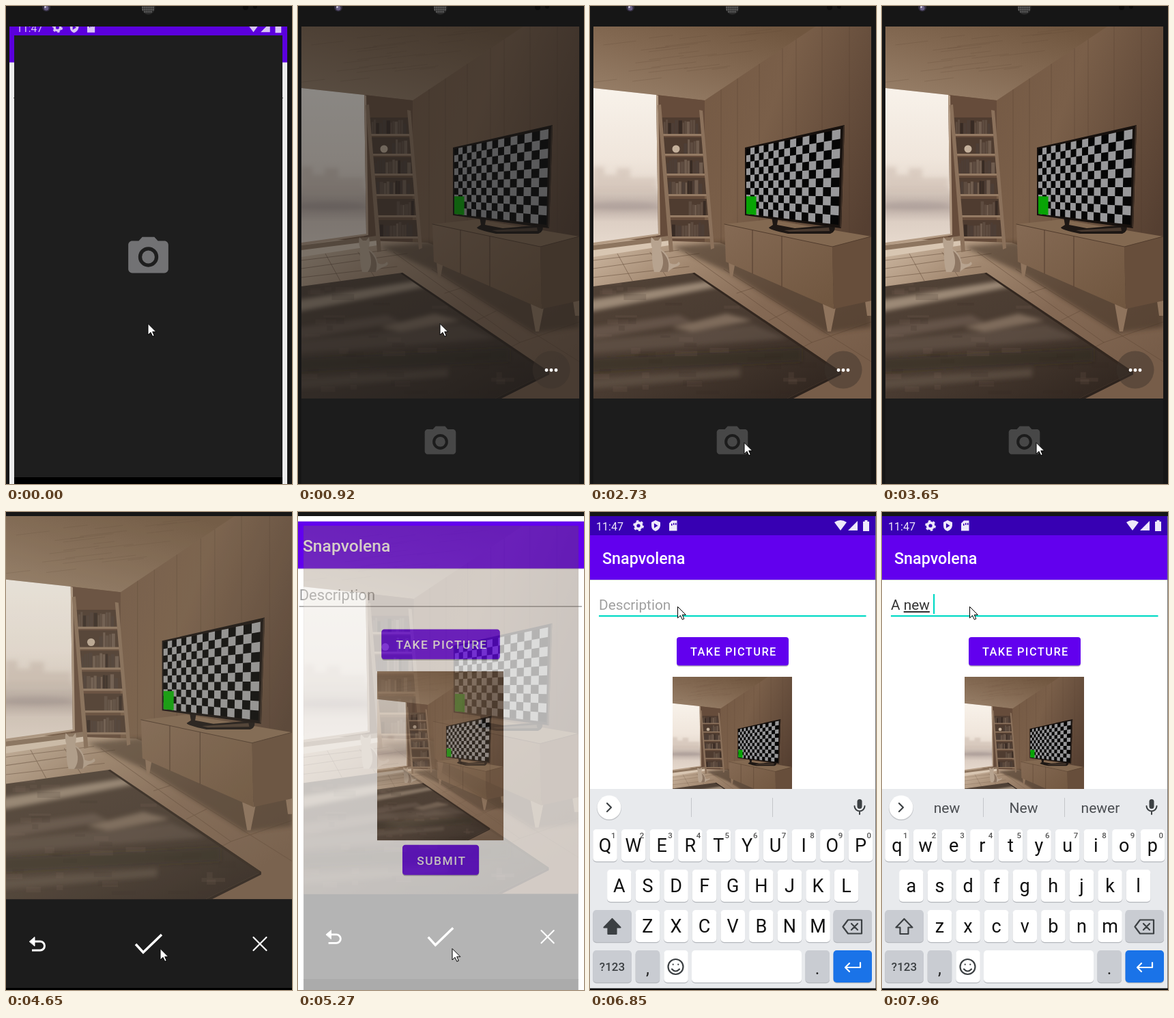
An HTML page that plays this animation: 419x699 px, repeating every 8000 ms.

```html
<!DOCTYPE html>
<html lang="en">
<head>
<meta charset="utf-8">
<title>Photo post</title>
<style>
html, body { margin: 0; width: 100%; height: 100%; overflow: hidden; background: #161616; }
svg { display: block; width: 100%; height: 100%; font-family: Roboto, sans-serif; }
text { white-space: pre; }
.btn { font-size: 16.4px; font-weight: 500; letter-spacing: 1.46px; fill: #fff; }
.line { fill: none; stroke-linecap: round; stroke-linejoin: round; }
</style>
</head>
<body>
<svg viewBox="0 0 419 699" preserveAspectRatio="none">
<defs>
  <linearGradient id="ceil" x1="0" y1="1" x2=".8" y2="0">
    <stop offset="0" stop-color="#9a826b"/><stop offset=".5" stop-color="#856b54"/><stop offset="1" stop-color="#70563f"/>
  </linearGradient>
  <linearGradient id="wall" x1="0" y1="0" x2="1" y2=".5">
    <stop offset="0" stop-color="#6d523e"/><stop offset=".6" stop-color="#7a5f49"/><stop offset="1" stop-color="#553f31"/>
  </linearGradient>
  <linearGradient id="sky" x1="0" y1="0" x2="0" y2="1">
    <stop offset="0" stop-color="#f8f2ea"/><stop offset=".45" stop-color="#f0e6dc"/><stop offset=".62" stop-color="#e6dacf"/>
    <stop offset=".7" stop-color="#cbbdb3"/><stop offset=".77" stop-color="#bbaca4"/><stop offset=".86" stop-color="#ddcfc4"/><stop offset="1" stop-color="#e6d9cd"/>
  </linearGradient>
  <linearGradient id="floor" x1="0" y1="0" x2=".9" y2=".8">
    <stop offset="0" stop-color="#d0bba5"/><stop offset=".3" stop-color="#a1876f"/><stop offset=".6" stop-color="#856a55"/><stop offset="1" stop-color="#775d49"/>
  </linearGradient>
  <linearGradient id="rug" x1="0" y1="0" x2="1" y2="1">
    <stop offset="0" stop-color="#524337"/><stop offset=".5" stop-color="#493b31"/><stop offset="1" stop-color="#2d231d"/>
  </linearGradient>
  <linearGradient id="front" x1="0" y1="0" x2="1" y2="1">
    <stop offset="0" stop-color="#856a54"/><stop offset="1" stop-color="#70563f"/>
  </linearGradient>
  <filter id="soft" x="-20%" y="-50%" width="140%" height="200%"><feGaussianBlur stdDeviation="3"/></filter>
  <clipPath id="view"><rect x="5" y="30" width="407" height="544"/></clipPath>
  <clipPath id="rugClip"><path d="M5 410L153 390L368 535L289 574H5Z"/></clipPath>
  <clipPath id="peek"><rect x="5" y="30" width="407" height="13"/></clipPath>

  <path id="camera" transform="translate(-12 -11)" d="M9 2L7.2 4H4c-1.1 0-2 .9-2 2v12c0 1.1.9 2 2 2h16c1.1 0 2-.9 2-2V6c0-1.1-.9-2-2-2h-3.2L15 2zM12 17a5 5 0 1 1 0-10a5 5 0 1 1 0 10zM12 15.2a3.2 3.2 0 1 0 0-6.4a3.2 3.2 0 1 0 0 6.4z" fill-rule="evenodd"/>

  <g id="scene" clip-path="url(#view)">
    <rect x="5" y="30" width="407" height="544" fill="url(#wall)"/>
    <path d="M5 30H330L168 138L97 130L5 120Z" fill="url(#ceil)"/>
    <path d="M97 130L168 138V356H97Z" fill="#664c3b"/>
    <g id="planks"/>
    <path d="M5 340L190 346L412 430V574H5Z" fill="url(#floor)"/>
    <g class="line" stroke="#5e4735" stroke-opacity=".5">
      <path d="M5 384L160 362M5 397L145 381M40 362L62 402M88 360L112 396M140 360L325 492L412 462M196 385L412 520M240 412L215 420M290 446L262 460M325 492L300 505M5 372L130 357"/>
    </g>
    <path d="M120 352L195 345L412 425V470L345 478L200 388Z" fill="#3d2d22" opacity=".55" filter="url(#soft)"/>
    <path d="M5 120L97 130L100 335L5 347Z" fill="url(#sky)"/>
    <g fill="#cbbaae" opacity=".5" filter="url(#soft)">
      <path d="M5 235h16v12h18v-10h20v14h38v22H5z"/><ellipse cx="50" cy="292" rx="48" ry="6" fill="#a79a96"/>
    </g>
    <path d="M97 130L100 131L103 335L5 350V346L100 333Z" fill="#b39b84"/>
    <path d="M5 350L116 336V344L5 359Z" fill="#8d755f"/>
    <path d="M5 357L116 343V350L5 367Z" fill="#d8c6b2"/>
    <g id="shelves"/>
    <path d="M99 145l5-1L122 359l-6 1zM160 152l5 1L182 354l-5 2z" fill="#8b715b"/>
    <circle cx="126" cy="209" r="5.5" fill="#c4b09b"/>
    <g fill="#b7a38f">
      <path d="M91 354Q88 346 90 338L95 343H100L104 338Q106 348 103 355Q115 362 117 376Q126 380 130 374Q134 377 129 380Q118 384 114 389H94Q90 376 91 354Z"/>
      <path d="M104 358Q119 370 114 389H102Q111 378 104 358Z" fill="#8d7663"/>
    </g>
    <path d="M5 410L153 390L368 535L289 574H5Z" fill="url(#rug)"/>
    <g id="rugLight" clip-path="url(#rugClip)"/>
    <path d="M153 390L368 535L366 538L150 391Z" fill="#33271f"/>
    <path d="M289 574L368 535V539L298 574Z" fill="#2d231d"/>
    <path d="M203 374h10l-4 22h-4zM341 436h20l-8 40h-5zM402 425h10v28h-6z" fill="#8f745d"/>
    <path d="M197 319L262 312L412 337L355 352Z" fill="#836951"/>
    <path d="M197 319L355 352L357 443L199 374Z" fill="url(#front)"/>
    <path d="M355 352L412 337V431L357 443Z" fill="#674e3b"/>
    <path d="M238 328V391M281 337V410M197 319L355 352L412 337" class="line" stroke="#523d2e"/>
    <path d="M266 308H276L274 320L300 325L358 320Q361 330 352 333L290 333Q262 327 262 324L268 320Z" fill="#1d1714"/>
    <path d="M284 328L350 324L351 329L292 330Z" fill="#4a3a2f"/>
    <path d="M227 207L373 174L368 325L227 306Z" fill="#17110e"/>
    <path d="M371 176L373 174L368 325L366 323Z" fill="#3a2c23"/>
    <path d="M229 209L367 180L364 320L229 304Z" fill="#060606"/>
    <path id="checks" fill="#98989a"/>
    <path id="green" fill="#08a405"/>
  </g>

  <g id="statusIcons" fill="#eee8fa">
    <text x="9" y="26.5" font-size="16.1">11:47</text>
    <circle cx="71" cy="20" r="4.4" fill="none" stroke="#eee8fa" stroke-width="3.6"/>
    <circle cx="71" cy="20" r="6.8" fill="none" stroke="#eee8fa" stroke-width="2.2" stroke-dasharray="3.56"/>
    <path d="M96 12L103 15V20Q102 26 96 28Q90 26 90 20V15ZM94 16.5V23.5L99.5 20Z" fill-rule="evenodd"/>
    <path d="M120 12.5H127.5V27.5H116V16.5ZM119 17v3h1.5v-3zM122 16v3h1.5v-3zM125 16v3h1.5v-3z" fill-rule="evenodd"/>
    <path d="M358 15Q367 9 376 15L367 27ZM378 27L392 13V27ZM400 14h2.5v-2h4v2h2.5v14h-9z"/>
  </g>
</defs>

<rect width="419" height="699" fill="#161616"/>

<g id="phone">
  <circle cx="59" cy="2" r="6" fill="#302c3c"/><circle cx="59" cy="3" r="3.5" fill="#655d83"/><circle cx="57.5" cy="1.5" r="1.5" fill="#c8c4d6"/>
  <circle cx="208.5" cy="2.5" r="10" fill="#2c2c2c"/>
  <g id="speaker" fill="#808080"/>
  <circle cx="351" cy="2" r="4" fill="#0b0b0b"/><circle cx="365" cy="1" r="3" fill="#0b0b0b"/>
  <g id="behind">
    <rect x="5" y="30" width="407" height="669" fill="#ececec"/>
    <rect x="5" y="30" width="407" height="52.5" fill="#5b00dd"/>
    <rect x="11" y="134" width="395" height="1" fill="#555"/>
    <g clip-path="url(#peek)" opacity=".85"><use href="#statusIcons" transform="translate(6.5 12) scale(.97)"/></g>
  </g>
  <g id="splash">
    <rect x="5" y="30" width="407" height="669" fill="#1e1e1e"/>
    <rect x="5" y="699" width="407" height="20" fill="#000"/>
    <use href="#camera" transform="translate(208.5 362.5) scale(3.04)" fill="#727274"/>
  </g>
  <g id="finder">
    <rect x="5" y="30" width="407" height="669" fill="#1c1c1c"/>
    <use id="live" href="#scene"/>
    <circle cx="371" cy="532" r="27.5" fill="#3a312b" opacity=".45"/>
    <g fill="#fff"><circle cx="364" cy="532.5" r="2.4"/><circle cx="371" cy="532.5" r="2.4"/><circle cx="378" cy="532.5" r="2.4"/></g>
    <use id="shutter" href="#camera" transform="translate(208.5 635) scale(2.28)"/>
  </g>
</g>

<g id="form">
  <rect y="6" width="419" height="693" fill="#fff"/>
  <g id="page">
    <rect x="-5" y="34" width="429" height="66" fill="#b9b4c4" opacity=".6"/>
    <rect x="-5" y="34" width="429" height="65" fill="#6200ee"/>
    <text x="18" y="76" font-size="23.3" font-weight="500" fill="#fff">Snapvolena</text>
    <text id="hint" x="13" y="143" font-size="20.8" fill="#a0a0a0">Description</text>
    <text id="entry" x="13" y="143" font-size="20.8" fill="#333"><tspan></tspan><tspan text-decoration="underline"></tspan></text>
    <rect id="rule" x="13" width="391.5"/>
    <rect id="caret" y="120" width="2.2" height="29" fill="#03dac5"/>
    <rect x="127" y="184" width="164" height="42" rx="4" fill="#bbb"/>
    <rect x="127" y="183" width="164" height="41.5" rx="4" fill="#6200ee"/>
    <text x="147" y="210" class="btn">TAKE PICTURE</text>
    <use href="#scene" transform="translate(118.85 228.1) scale(.43)"/>
    <rect x="156" y="482" width="106" height="42" rx="4" fill="#bbb"/>
    <rect x="156" y="481" width="106" height="41.5" rx="4" fill="#6200ee"/>
    <text x="176" y="508.5" class="btn">SUBMIT</text>
  </g>
  <g id="keyboard"></g>
  <g id="chrome">
    <rect y="6" width="419" height="28" fill="#3700b3"/>
    <use href="#statusIcons"/>
    <rect x="418" y="6" width="1" height="691" fill="#777"/>
    <rect y="696.5" width="419" height="3" fill="#0c0c0c"/>
  </g>
</g>

<g id="review">
  <rect y="6" width="419" height="691" fill="#1c1c1c"/>
  <rect y="696" width="419" height="40" fill="#000"/>
  <use href="#scene" transform="translate(-5.15 -24.9) scale(1.03)"/>
  <rect y="6" width="419" height="560" fill="#8c8670" opacity=".16"/>
  <g id="actions" class="line" stroke="#fff" stroke-width="2.5">
    <path d="M34.500 628L42 621.500V634.500Z" fill="#fff" stroke-width="1"/>
    <path d="M40 628H50a6.500 6.500 0 0 1 0 13H38" stroke-linecap="butt" stroke-width="3"/>
    <path d="M190 632L201 644L228 618" stroke-width="3.5" stroke-linecap="butt" stroke-linejoin="miter"/>
    <path d="M362.5 622L381.5 641M381.5 622L362.5 641" stroke-width="2.2"/>
  </g>
</g>
<rect id="bezel" width="419" height="6" fill="#161616"/>
<path id="pointer" d="M0 0V16.5L4 12.8L6.8 18.8L9.3 17.7L6.7 11.8H11.8Z" fill="#fff" stroke="#000"/>
</svg>

<script>
const $ = id => document.getElementById(id);
const show = (id, on) => { $(id).style.display = on ? '' : 'none'; };
const set = (id, attrs) => { for (const k in attrs) $(id).setAttribute(k, attrs[k]); };
const rect = (x, y, w, h, fill, extra = '') =>
  `<rect x="${x}" y="${y}" width="${w}" height="${h}" fill="${fill}" ${extra}/>`;

let seed = 7;
const rnd = (a, b) => {
  seed = (seed * 16807) % 2147483647;
  return a + (b - a) * seed / 2147483647;
};

// Maps the unit square to a quad in perspective.
function project([x0, y0], [x1, y1], [x2, y2], [x3, y3]) {
  const ax = x1 - x2, bx = x3 - x2, sx = x0 - x1 + x2 - x3;
  const ay = y1 - y2, by = y3 - y2, sy = y0 - y1 + y2 - y3;
  const d = ax * by - bx * ay;
  const g = (sx * by - bx * sy) / d, h = (ax * sy - sx * ay) / d;
  return (u, v) => {
    const w = g * u + h * v + 1;
    const x = ((x1 - x0 + g * x1) * u + (x3 - x0 + h * x3) * v + x0) / w;
    const y = ((y1 - y0 + g * y1) * u + (y3 - y0 + h * y3) * v + y0) / w;
    return x.toFixed(1) + ' ' + y.toFixed(1);
  };
}

function buildScene() {
  const cols = 16, rows = 10;
  const p = project([229, 209], [367, 180], [364, 320], [229, 304]);
  const cell = (c, r, w = 1, h = 1) => 'M' + [[c, r], [c + w, r], [c + w, r + h], [c, r + h]]
    .map(([x, y]) => p(x / cols, y / rows)).join('L') + 'Z';
  let d = '';
  for (let r = 0; r < rows; r++)
    for (let c = 0; c < cols; c++) if ((r + c) % 2) d += cell(c, r);
  set('checks', { d });
  set('green', { d: cell(0, 7.25, 2.4, 2.75) });

  let s = '';
  for (const x of [192, 216, 248, 282, 302, 340, 380]) {
    const top = Math.max(30, 138 - (x - 168) * .667);
    s += `<path d="M${x} ${top}V350" stroke="#4c3829" stroke-opacity=".3"/>`;
  }
  for (let i = 0; i < 28; i++) {
    const x = rnd(5, 250), y = rnd(34, 118), l = rnd(20, 70);
    if (y < 125 - Math.max(0, x + l - 175) * .667)
      s += `<path d="M${x} ${y}l${l} ${-l * .12}" stroke="#5d4634" stroke-opacity=".22"/>`;
  }
  $('planks').innerHTML = s;

  s = '';
  [188, 217, 246, 276, 307, 338].forEach((y, i) => {
    const left = 103 + i * 2.4, right = 164 + i * 2.6;
    s += rect(left, y - 25, right - left, 25, '#4f3c30');
    for (let x = i == 1 || i == 4 ? left + 32 : left + 5; ; ) {
      const w = rnd(3, 6);
      if (x + w > right - 3) break;
      const h = rnd(16, 22);
      s += rect(x, y - h, w - .6, h, ['#5e4c40', '#382b24', '#6f5c4e', '#4d3e36'][Math.floor(rnd(0, 4))]);
      x += w;
    }
    s += rect(left, y - 1, right - left, 3, '#957b64');
  });
  $('shelves').innerHTML = s;

  s = '<g filter="url(#soft)"><path d="M0 430L172 402L190 410L0 447Z" fill="#b09b87" opacity=".8"/>' +
    '<path d="M120 470L200 450L238 460L150 476Z" fill="#a08a77" opacity=".6"/>' +
    '<path d="M0 470L130 452L150 462L0 488Z" fill="#7d6b5d" opacity=".5"/>' +
    '<path d="M0 490L240 466L290 486L0 508Z" fill="#75645a" opacity=".4"/>' +
    '<path d="M0 515L310 500V520L0 535Z" fill="#2f2520" opacity=".35"/>' +
    '<path d="M0 545L220 530V542L0 560Z" fill="#6d5c50" opacity=".5"/></g>';
  for (let i = 0; i < 45; i++)
    s += rect(rnd(0, 320), rnd(400, 570), rnd(8, 34), rnd(3, 9), i % 2 ? '#7a6656' : '#33281f', 'opacity=".16"');
  $('rugLight').innerHTML = s;

  s = '';
  for (let y = -6; y <= 8; y += 3)
    for (let x = -8; x <= 8; x += 3)
      if (x * x + y * y < 80) s += `<circle cx="${208.5 + x}" cy="${2.5 + y}" r=".9"/>`;
  $('speaker').innerHTML = s;
}

function buildKeyboard() {
  const pitch = 41.6, grey = '#c9ccd2', ink = '#3c4043';
  const key = (x, y, w, fill = '#fff') =>
    rect(x, y + 1.2, w, 47, '#b4b7bc', 'rx="5"') + rect(x, y, w, 47, fill, 'rx="5"');
  const label = (x, y, size, text, extra = '') =>
    `<text x="${x}" y="${y}" font-size="${size}" text-anchor="middle" ${extra}>${text}</text>`;

  let s = rect(0, 405, 419, 294, '#e8eaed') +
    '<circle cx="28" cy="433" r="18" fill="#c4c6ca"/><circle cx="28" cy="432" r="17.5" fill="#fff"/>' +
    `<path d="M25 426L31 432L25 438" class="line" stroke="${ink}" stroke-width="2.2"/>` +
    rect(148, 418, 1, 28, '#c4c6ca') + rect(267, 418, 1, 28, '#c4c6ca') +
    [95, 207.5, 320].map(x => label(x, 440, 21, '', 'class="word" fill="#4a4d51"')).join('') +
    rect(391.5, 420, 7, 14, ink, 'rx="3.5"') +
    `<path d="M387.5 430a7.5 7.5 0 0 0 15 0M395 438V442" class="line" stroke="${ink}" stroke-width="2"/>`;

  [['qwertyuiop', 4.3, 464], ['asdfghjkl', 25.1, 523], ['zxcvbnm', 66.7, 582]].forEach(([row, x0, y], r) => {
    [...row].forEach((c, i) => {
      const x = x0 + i * pitch;
      s += key(x, y, 35.5) + label(x + 17.7, y + 32.5, 27, c, 'class="letter" fill="#111"');
      if (!r) s += label(x + 30, y + 13, 11.5, (i + 1) % 10, 'fill="#555" font-weight="500"');
    });
  });

  s += key(4.3, 582, 56.5, grey) + key(356.5, 582, 56.5, grey) +
    key(4.3, 641, 56.5, grey) + key(66.7, 641, 35.5, grey) + key(108.3, 641, 35.5) +
    key(149, 641, 161) + key(315.5, 641, 35.5, grey) + key(356.5, 641, 56.5, '#1a73e8') +
    label(32.5, 671, 17, '?123', `fill="${ink}" font-weight="500"`) +
    label(84.5, 676, 25, ',', 'fill="#222"') + label(333, 676, 25, '.', 'fill="#222"') +
    `<g class="line" stroke="${ink}" stroke-width="2.2">
      <path id="shift" d="M32.5 595L20.5 607.5H26.5V617H38.5V607.5H44.5Z"/>
      <path d="M370.5 606.5L378 596.5H398V616.5H378ZM383 602L392 611M392 602L383 611"/>
      <circle cx="125.5" cy="665" r="11"/><path d="M120 668.5Q125.5 674.5 131 668.5M121.7 661.5v.2M129.3 661.5v.2"/>
      <path d="M396 659V666H374.5M380 660L374 666L380 672" stroke="#fff"/>
    </g>`;
  $('keyboard').innerHTML = s;
}

buildScene();
buildKeyboard();

const pen = document.createElement('canvas').getContext('2d');
const words = [...document.querySelectorAll('.word')];
const letters = [...document.querySelectorAll('.letter')];
const [plain, composing] = $('entry').children;

const LOOP = 8000, TEXT = 'A new ';
const OFFERS = ['', 'A And At', 'new great few', 'n new nice', 'ne new need', 'new New newer', 'new New newer'];
// time, x, y
const POINTER = [
  [0, 208, 464.5], [1050, 212, 525], [1170, 219, 600], [1310, 224, 632], [1430, 226, 637], [1580, 226, 638.5],
  [5390, 225, 620], [5540, 221, 575], [5690, 200, 430], [5810, 165, 275], [5930, 134, 160], [6050, 128.5, 138.5]
];
const at = (keys, t) => keys.filter(k => k[0] <= t).pop();
const zoom = (k, cx, cy) => `translate(${cx * (1 - k)} ${cy * (1 - k)}) scale(${k})`;

function drawField(t) {
  const n = t < 7360 ? 0 : Math.min(6, 1 + Math.floor((t - 7360) / 120));
  const focus = t >= 6330, typed = TEXT.slice(0, n);
  show('hint', !n);
  plain.textContent = n < 2 ? '' : 'A ';
  composing.textContent = n < 2 ? typed : typed.slice(2, 5);
  set('rule', focus ? { y: 151, height: 2.2, fill: '#03dac5' } : { y: 151, height: 1, fill: '#777' });
  pen.font = '20.8px Roboto, sans-serif';
  set('caret', { x: 13 + pen.measureText(typed).width });
  show('caret', focus && (t < 6850 || n));

  show('keyboard', t >= 6710);
  set('keyboard', { transform: `translate(0 ${t < 6850 ? 38 : 0})` });
  const offers = OFFERS[n].split(' ');
  words.forEach((w, i) => { w.textContent = offers[i] || ''; });
  letters.forEach(l => {
    l.textContent = n ? l.textContent.toLowerCase() : l.textContent.toUpperCase();
  });
  set('shift', { fill: n ? 'none' : '#3c4043' });
}

function draw(t) {
  const phone = t < 4530;
  show('phone', phone);
  show('bezel', !phone);
  show('behind', t < 370);
  show('splash', t < 920);
  set('splash', { transform: zoom(t < 370 ? .9656 : 1, 208.5, 407.5) });
  show('finder', t >= 920);
  set('live', { opacity: t < 1050 ? .5 : t < 1170 ? .8 : 1 });
  set('shutter', { fill: t >= 1170 && t < 2200 ? '#fff' : '#474747' });

  show('review', !phone && t < 5540);
  const leaving = t >= 5390 ? 2 : t >= 5270 ? 1 : 0;
  set('review', { opacity: [1, .326, .08][leaving], transform: zoom([1, .961, .955][leaving], 208, 368) });
  set('actions', { opacity: t < 4650 ? .5 : 1 });

  show('form', t >= 5270);
  show('chrome', t >= 5390);
  set('page', { transform: zoom(t < 5390 ? 1.058 : t < 5540 ? 1.015 : 1, 208, 382) });
  drawField(t);

  const [, x, y] = at(POINTER, t);
  set('pointer', { transform: `translate(${x} ${y})` });
  show('pointer', t < 120 || t >= 370);
}

const start = performance.now();
function tick(now) {
  draw(Math.max(0, now - start) % LOOP);
  requestAnimationFrame(tick);
}
draw(0);
requestAnimationFrame(tick);
</script>
</body>
</html>
```
